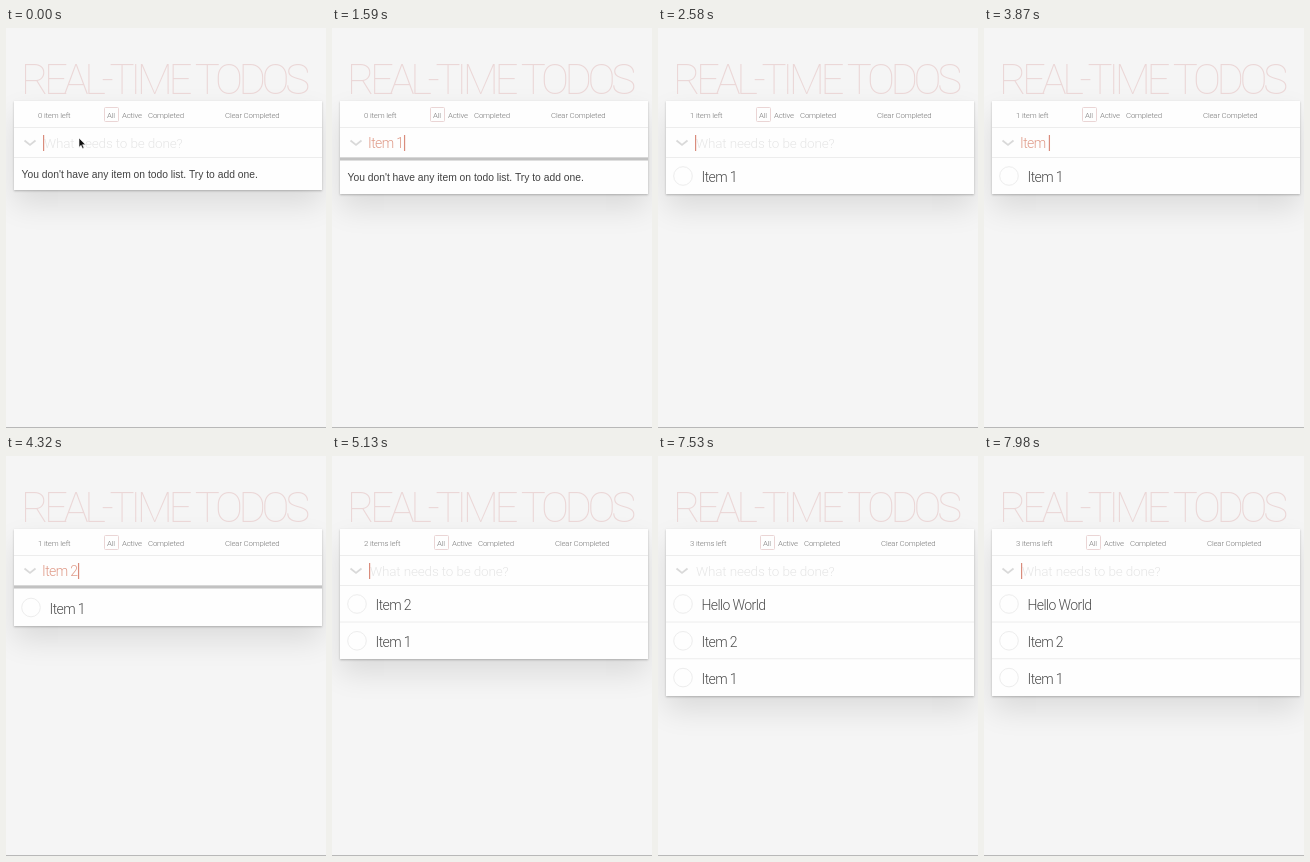
Recreate the animation shown at these times as an HTML page. Size 320 by 400 pixels, loop 8 s.

```html
<!DOCTYPE html>
<html lang="en">
<head>
<meta charset="utf-8">
<title>Real-time todos</title>
<style>
  html, body { margin: 0; width: 100%; height: 100%; overflow: hidden; background: #f5f5f5; }
  #stage { position: relative; width: 320px; height: 400px; overflow: hidden; }
  #card {
    position: absolute; left: 7.5px; top: 73px; width: 308.5px; background: #fefefe;
    box-shadow: 0 1px 2px rgba(0, 0, 0, .24), 0 14px 28px rgba(0, 0, 0, .11);
  }
  svg { position: absolute; left: 0; top: 0; }
  text { white-space: pre; font-family: Roboto, "Liberation Sans", sans-serif; font-weight: 300; }
  .title { font-size: 42px; font-weight: 100; letter-spacing: -4.4px; word-spacing: 2px; fill: #ebd7d7; }
  .small { font-size: 7.8px; letter-spacing: -.16px; fill: #777; }
  .large { font-size: 14px; letter-spacing: -.6px; fill: #4d4d4d; }
  .notice { font: 400 10.3px "Liberation Sans", Arial, sans-serif; fill: #404040; }
  #entry { fill: #df9a88; }
  #hint { font-size: 13.5px; letter-spacing: -.15px; fill: #e6e6e6; }
  #caret { fill: #d98c7c; }
  .rule { stroke: #ededed; }
  .ring, .box { fill: none; stroke: #ededed; }
  .box { stroke: #ead5d5; }
  .chevron { fill: none; stroke: #d9d9d9; stroke-width: 1.7; }
</style>
</head>
<body>
<div id="stage">
  <div id="card"></div>
  <svg width="320" height="400" viewBox="0 0 320 400">
    <text class="title" x="15" y="66">REAL-TIME TODOS</text>

    <text class="small" id="count" x="32" y="89.5"></text>
    <g id="filters">
      <rect class="box" x="98.5" y="79.5" width="14" height="14" rx="1"/>
      <text class="small" x="101" y="89.5">All</text>
      <text class="small" x="116" y="89.5">Active</text>
      <text class="small" x="142" y="89.5">Completed</text>
      <text class="small" x="219" y="89.5">Clear Completed</text>
    </g>

    <path class="rule" d="M8 99.5H316M8 129.5H316"/>
    <path class="chevron" d="M18.5 112.5L24 117L29.5 112.5"/>
    <text class="large" id="hint" x="38" y="120">What needs to be done?</text>
    <text class="large" id="entry" x="36" y="120"></text>
    <rect id="caret" y="107" width="1.2" height="16"/>

    <rect id="busy" x="8" y="129.5" width="308" height="3" fill="#c2c2c2"/>
    <g id="list"></g>
    <text class="notice" id="notice" x="15.5">You don't have any item on todo list. Try to add one.</text>

    <path id="pointer" d="M73 110V119.3L75.1 117.3L76.5 120.6L78 120L76.6 116.7H79.5Z"
      fill="#111" stroke="#fff" stroke-width=".6"/>
    <path d="M0 399.5H320" stroke="#b8b8b8"/>
  </svg>
</div>
<script>
  const LOOP = 8000, ROW = 36.8, LIST_TOP = 129.5;
  const $ = id => document.getElementById(id);

  // Each entry is typed key by key and sent; the list changes when the reply arrives.
  const entries = [
    { text: "Item 1", keys: [750, 870, 960, 1050, 1170, 1320], send: 1560, done: 1770 },
    { text: "Item 2", keys: [3300, 3420, 3540, 3630, 3750, 4000], send: 4290, done: 4470 },
    { text: "Hello World",
      keys: [5460, 5550, 5640, 5720, 5790, 6400, 6540, 6630, 6720, 6810, 6900],
      send: 7140, done: 7320 }
  ];
  const lists = [
    { at: 0, items: [] },
    { at: 1770, items: ["Item 1"] },
    { at: 4470, items: ["Item 2", "Item 1"] },
    { at: 5400, items: [] },
    { at: 7320, items: ["Hello World", "Item 2", "Item 1"] }
  ];

  $("list").innerHTML = [0, 1, 2].map(i => `
    <g transform="translate(0 ${i * ROW})">
      <circle class="ring" cx="25" cy="18.5" r="9.3"/>
      <text class="large" x="43.5" y="24.5"></text>
      <path class="rule" d="M8 36.5H316"/>
    </g>`).join("");
  const rows = [...$("list").children];

  const show = (el, on) => el.setAttribute("visibility", on ? "visible" : "hidden");
  const setText = (el, text) => { if (el.textContent !== text) el.textContent = text; };
  const shift = (el, x, y) => el.setAttribute("transform", `translate(${x} ${y})`);

  function draw(now) {
    const t = now % LOOP;
    const { items } = lists.findLast(list => list.at <= t);
    const entry = entries.find(e => t >= e.keys[0] && t < e.done);
    const typed = entry ? entry.text.slice(0, entry.keys.filter(k => k <= t).length) : "";
    const busy = Boolean(entry && t >= entry.send);
    const offset = busy ? 3.5 : 0;
    const n = items.length;

    setText($("count"), `${n} item${n > 1 ? "s" : ""} left`);
    shift($("filters"), n > 1 ? 4 : 0, 0);

    setText($("entry"), typed);
    show($("hint"), !typed);
    const lastKey = Math.max(0, ...entries.flatMap(e => e.keys).filter(k => k <= t));
    show($("caret"), (t - lastKey) % 1000 < 500);
    $("caret").setAttribute("x", typed ? 36.5 + $("entry").getComputedTextLength() : 37);

    show($("busy"), busy);
    shift($("list"), 0, LIST_TOP + offset);
    rows.forEach((row, i) => {
      show(row, i < n);
      setText(row.querySelector("text"), items[i] || "");
      show(row.querySelector(".rule"), i < n - 1);
    });
    show($("notice"), !n);
    $("notice").setAttribute("y", 149.5 + offset);
    $("card").style.height = LIST_TOP - 73 + offset + (n ? n * ROW : 32.5) + "px";
    show($("pointer"), t < entries[0].keys[0]);
  }

  function tick(now) {
    draw(now);
    requestAnimationFrame(tick);
  }
  draw(0);
  requestAnimationFrame(tick);
</script>
</body>
</html>
```
